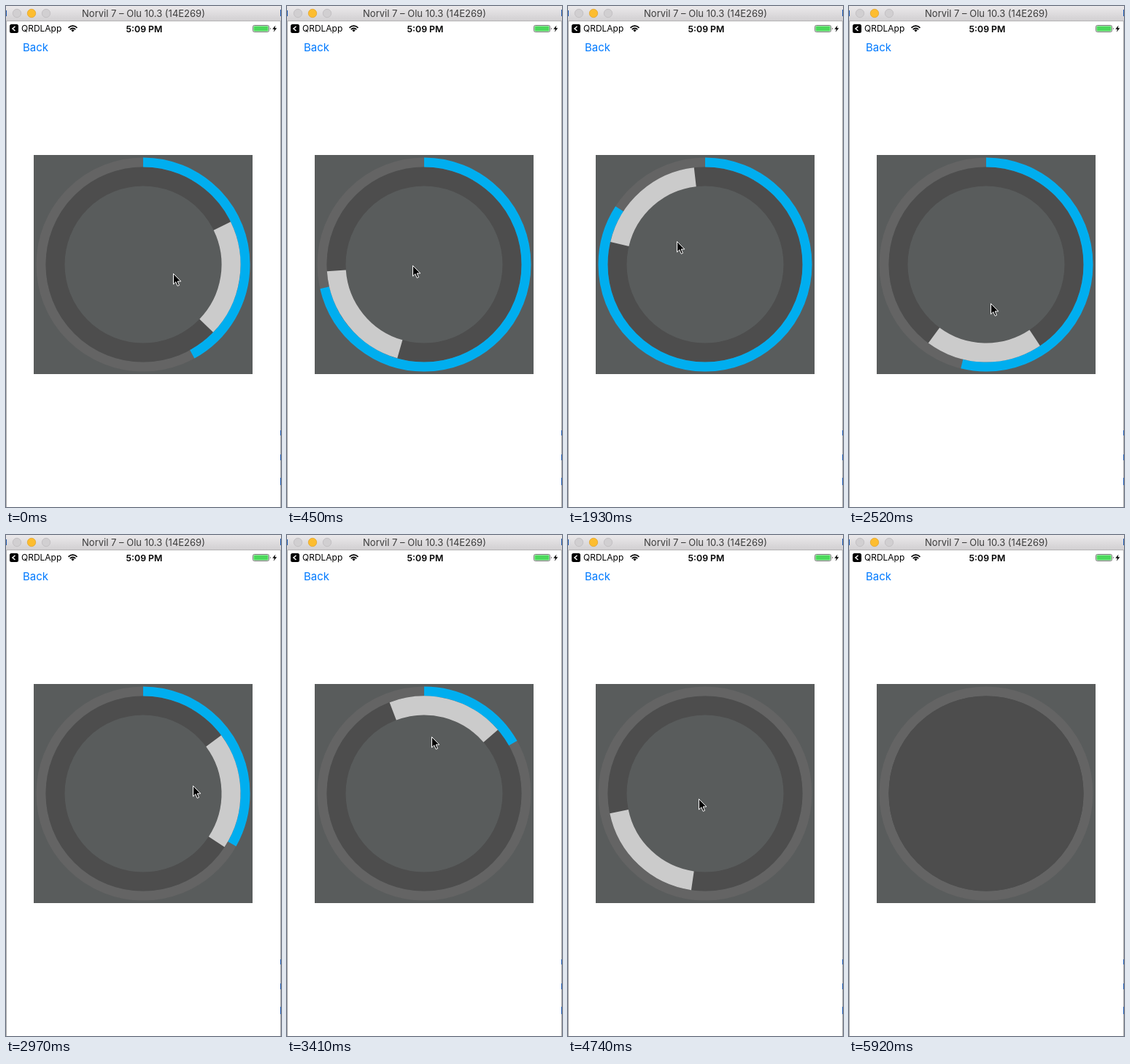
An HTML page for the animation above (6.07 s loop, 377 px wide and 686 px high).

```html
<!DOCTYPE html>
<html lang="en">
<head>
<meta charset="utf-8">
<title>Ring dial</title>
<style>
  html, body { margin: 0; width: 100%; height: 100%; overflow: hidden; background: #fff; }
  svg { display: block; width: 100%; height: 100%; }
  text { font-family: Inter, Roboto, sans-serif; }
</style>
</head>
<body>
<svg viewBox="0 0 377 686">
  <defs>
    <linearGradient id="bar" x2="0" y2="1">
      <stop stop-color="#ebe9eb"/><stop offset="1" stop-color="#d2d0d2"/>
    </linearGradient>
  </defs>
  <rect width="377" height="686" fill="#fff"/>

  <!-- window frame -->
  <rect width="377" height="20" fill="url(#bar)"/>
  <path d="M0 20.5H377" stroke="#b5b3b5"/>
  <path d="M.5 21V686M376.5 21V686" stroke="#a9a9ab"/>
  <path d="M376.5 581v7m0 26v8m0 24v10M376.5 5v9M.5 6v8" stroke="#1c58b0"/>
  <g stroke-width=".8">
    <circle cx="15" cy="10" r="5.7" fill="#d1cfd1" stroke="#bebcbe"/>
    <circle cx="35" cy="10" r="5.7" fill="#fdbd2f" stroke="#e2a52c"/>
    <circle cx="55" cy="10" r="5.7" fill="#d1cfd1" stroke="#bebcbe"/>
  </g>
  <text x="188.5" y="15" font-size="13" text-anchor="middle" fill="#3c3c3c">Norvil 7 – Olu 10.3 (14E269)</text>

  <!-- status bar -->
  <rect x="5" y="25" width="12" height="12" rx="2.5"/>
  <path d="M12.5 28L9 31L12.5 34" fill="none" stroke="#fff" stroke-width="1.6"/>
  <text x="21" y="35.3" font-size="12">QRDLApp</text>
  <g fill="none" stroke="#000" stroke-width="1.7">
    <path d="M85.5 29.8Q91.500 24.400 97.500 29.800M87.700 32.200Q91.500 28.800 95.300 32.200"/>
    <path d="M89.300 33.300Q91.500 31.400 93.700 33.300L91.500 35.600Z" fill="#000" stroke="none"/>
  </g>
  <text x="189.500" y="35.500" font-size="12.300" font-weight="600" text-anchor="middle">5:09 PM</text>
  <rect x="338.500" y="26.500" width="22" height="9" rx="2" fill="#fff" stroke="#555" stroke-width=".8"/>
  <rect x="339.500" y="27.500" width="20" height="7" rx="1" fill="#4cd95c"/>
  <path d="M362 29.500q1.500 1.500 0 3z"/>
  <path d="M369.500 26.500L365.300 31.700H368L366.700 35.700L371.300 30.300H368.500Z"/>
  <text x="23" y="62" font-size="15" fill="#007aff">Back</text>

  <!-- dial -->
  <rect x="38" y="204" width="300" height="300" fill="#595c5c"/>
  <g transform="translate(188 354) rotate(-90)" fill="none">
    <circle r="140" stroke="#646464" stroke-width="13"/>
    <circle r="120.500" stroke="#4d4d4d" stroke-width="26"/>
    <circle id="disc" r="133.500" fill="#4d4d4d"/>
    <circle id="level" r="140" stroke="#00aeef" stroke-width="13" pathLength="360"/>
    <circle id="grip" r="120.500" stroke="#cbcbcb" stroke-width="26" pathLength="360" stroke-dasharray="70 290"/>
  </g>
  <path id="cursor" d="M.5 .5V15L3.800 11.800L6.200 17.300L8.500 16.300L6.200 11H10.800Z" stroke="#fff"/>
</svg>
<script>
const LOOP = 6070, STEP = 148, LAST = 40;
const TURN = 9, RELEASE = 35;

// step, grip angle, pointer angle, pointer radius
const keys = [
  [0, 99, 106, 42.7],
  [3, 231, 266, 16],
  [9, 390, 384.5, 50.6],
  [16, 223, 212, 50],
  [17, 181.4, 173.5, 53.3],
  [23, 14.2, 7.3, 78.6],
  [24, -2.3, -8, 76],
  [32, -136.8, -128, 11.4],
  [33, -143.5, -128, 11.4]
];

const byId = id => document.getElementById(id);
const [disc, level, grip, cursor] = ['disc', 'level', 'grip', 'cursor'].map(byId);
const show = (el, on) => el.setAttribute('visibility', on ? 'visible' : 'hidden');

const slope = (i, col) =>
  (keys[i + 1][col] - keys[i][col]) / (keys[i + 1][0] - keys[i][0]);

function tangent(i, col) {
  if (i === 0) return slope(0, col);
  if (i === keys.length - 1) return slope(i - 1, col);
  const a = slope(i - 1, col), b = slope(i, col);
  return a * b > 0 ? 2 * a * b / (a + b) : 0;
}

// monotone cubic through the keys
function track(n, col) {
  const end = keys.length - 1;
  if (n >= keys[end][0]) return keys[end][col];
  const i = keys.findIndex(k => k[0] > n) - 1;
  const span = keys[i + 1][0] - keys[i][0];
  const u = (n - keys[i][0]) / span, v = 1 - u;
  return v * v * (1 + 2 * u) * keys[i][col] + u * u * (3 - 2 * u) * keys[i + 1][col]
    + span * u * v * (v * tangent(i, col) - u * tangent(i + 1, col));
}

function pointer(n) {
  const a = track(n, 2) * Math.PI / 180, r = track(n, 3);
  const x = 188 + r * Math.sin(a), y = 354 - r * Math.cos(a);
  const out = Math.max(0, (n - RELEASE + 1) / 5);
  return [x + (334 - x) * out, y + (672 - y) * out];
}

function draw(n) {
  const held = n < RELEASE, angle = track(n, 1);
  const value = n < TURN ? 151.3 + 0.8 * (angle - 99) : 360 - 0.797 * (390 - angle);
  const arc = Math.max(0, Math.min(359.7, value));
  level.setAttribute('stroke-dasharray', `${arc} ${360 - arc}`);
  show(level, arc > 0);
  grip.setAttribute('transform', `rotate(${angle - 35})`);
  show(grip, held);
  show(disc, !held);
  cursor.setAttribute('transform', `translate(${pointer(n).map(Math.round)})`);
  show(cursor, n < LAST);
}

const start = performance.now();
function tick() {
  const t = (performance.now() - start) % LOOP;
  draw(Math.min(LAST, Math.floor((t + 5) / STEP)));
  requestAnimationFrame(tick);
}
tick();
</script>
</body>
</html>
```
